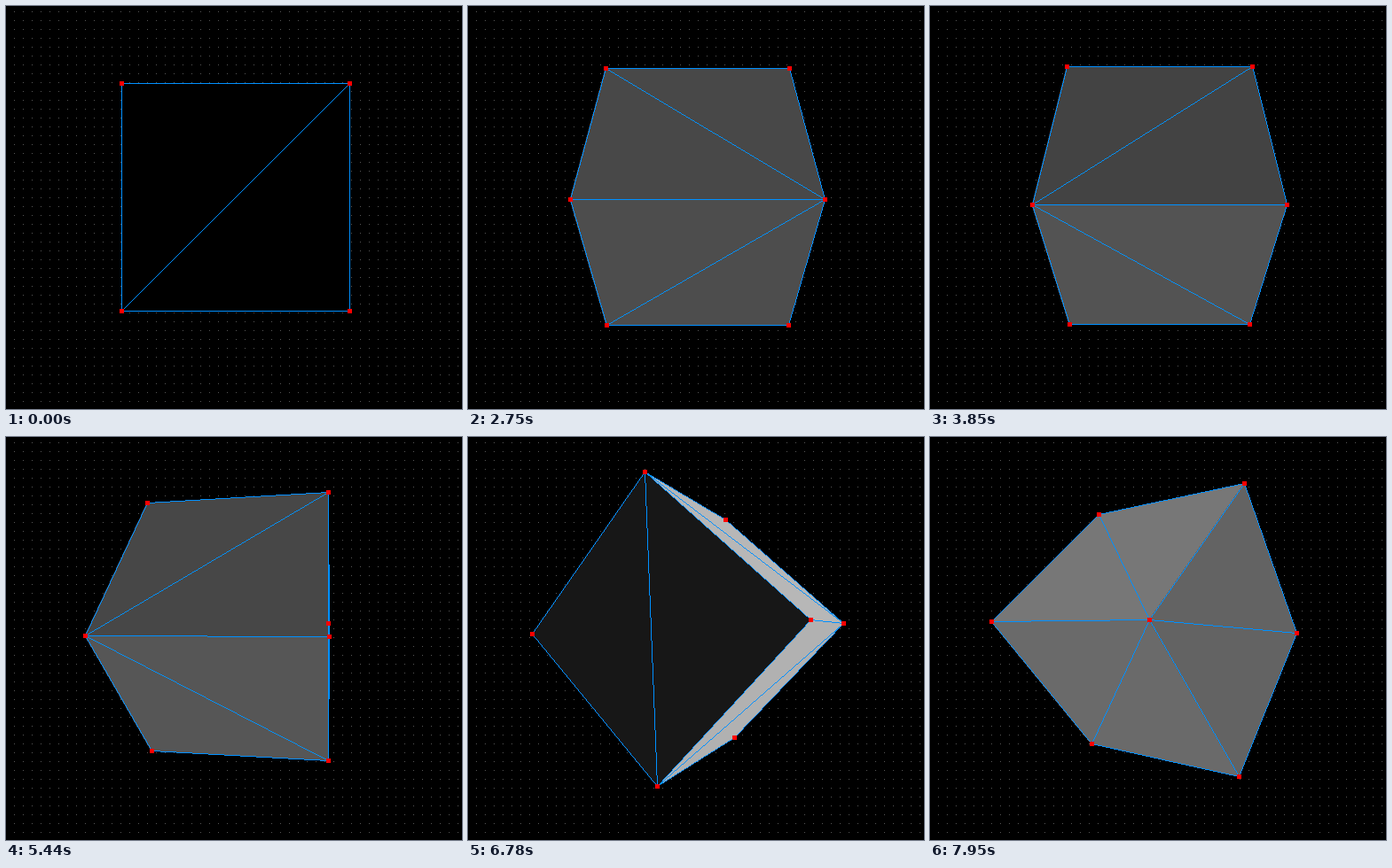
An HTML page with a canvas for the animation above (9.21 s loop, 514x455 px).

```html
<!DOCTYPE html>
<html lang="en">
<head>
<meta charset="utf-8">
<title>Rotating cube</title>
<style>
  html, body { margin: 0; width: 100%; height: 100%; overflow: hidden; background: #000; }
  canvas { display: block; }
</style>
</head>
<body>
<canvas id="stage" width="514" height="455"></canvas>
<script>
const ctx = document.getElementById('stage').getContext('2d');
const W = 514, H = 455, LOOP = 9210, TICK = LOOP / 110, LEAD = 15;
const CX = 258.45, CY = 215.5, FOCAL = W, DIST = 5;
const TURN = 0.2; // the cube turns in whole steps of this many radians
const BLUE = '#0090ff', RED = '#ff0000', DOT = '#555';

// Key points of each drag: [tick, steps turned]
const PITCH = [[28, 0], [30, 3], [44, 9], [46, 12]];
const YAW = [[64, 0], [65, 1], [68, 2], [70, 4], [75, 8], [77, 9], [83, 11],
             [84, 13], [88, 15], [91, 16], [93, 17], [95, 19]];

function turned(keys, tick) {
  if (tick <= keys[0][0]) return keys[0][1];
  const i = keys.findIndex(k => k[0] >= tick);
  if (i < 0) return keys[keys.length - 1][1];
  const [t0, v0] = keys[i - 1], [t1, v1] = keys[i];
  return Math.floor(v0 + (v1 - v0) * (tick - t0) / (t1 - t0) + 1e-6);
}

// Corner index bits: 1 = right, 2 = top, 4 = front.
// Diagonals join the corners that have an odd number of bits set.
const FACES = [4, 2, 1].flatMap(axis => [0, axis].map(side => {
  const [u, v] = [1, 2, 4].filter(bit => bit !== axis);
  const ring = [side, side | u, side | u | v, side | v];
  return side && axis ? ring : [...ring.slice(1), ring[0]];
}));

function corner(i, pitch, yaw) {
  const x = i & 1 ? 1 : -1, y = i & 2 ? 1 : -1, z = i & 4 ? 1 : -1;
  const cp = Math.cos(pitch), sp = Math.sin(pitch);
  const cw = Math.cos(yaw), sw = Math.sin(yaw);
  const y1 = y * cp - z * sp, z1 = y * sp + z * cp;
  const x2 = x * cw - z1 * sw, z2 = z1 * cw + x * sw;
  const k = FOCAL / (DIST - z2);
  return { x: Math.round(CX + x2 * k), y: Math.round(CY - y1 * k), z: z2 };
}

function line(a, b) {
  const dx = b.x - a.x, dy = b.y - a.y;
  const n = Math.max(Math.abs(dx), Math.abs(dy), 1);
  for (let i = 0; i <= n; i++)
    ctx.fillRect(Math.round(a.x + dx * i / n), Math.round(a.y + dy * i / n), 1, 1);
}

// Fills a convex shape row by row, without smoothing.
function fill(p) {
  const ys = p.map(q => q.y), bottom = Math.max(...ys);
  for (let y = Math.min(...ys); y <= bottom; y++) {
    const xs = [];
    p.forEach((a, i) => {
      const b = p[(i + 1) % p.length];
      if (a.y === b.y) {
        if (a.y === y) xs.push(a.x, b.x);
      } else if ((a.y - y) * (b.y - y) <= 0) {
        xs.push(a.x + (b.x - a.x) * (y - a.y) / (b.y - a.y));
      }
    });
    const left = Math.floor(Math.min(...xs));
    ctx.fillRect(left, y, Math.floor(Math.max(...xs)) - left + 1, 1);
  }
}

function grid() {
  ctx.fillStyle = '#000';
  ctx.fillRect(0, 0, W, H);
  ctx.fillStyle = DOT;
  for (let y = 6; y < 450; y += 10)
    for (let x = 9; x < W; x += 10) ctx.fillRect(x, y, 1, 1);
}

function drawFace(p, facing) {
  const v = Math.round(255 * (1 - facing));
  ctx.fillStyle = `rgb(${v},${v},${v})`;
  fill(p);
  ctx.fillStyle = BLUE;
  p.forEach((a, i) => line(a, p[(i + 1) % 4]));
  line(p[0], p[2]);
}

function draw(pitch, yaw) {
  const pts = Array.from({ length: 8 }, (_, i) => corner(i, pitch, yaw));
  const marked = new Set();
  grid();
  for (const face of FACES) {
    const p = face.map(i => pts[i]);
    const facing = (p[0].z + p[2].z) / 2;
    if (facing < 1e-6) continue;
    drawFace(p, facing);
    p.forEach(q => marked.add(q));
  }
  ctx.fillStyle = RED;
  marked.forEach(q => ctx.fillRect(q.x - 2, q.y - 2, 5, 5));
}

const start = performance.now();

function frame() {
  const t = (performance.now() - start) % LOOP;
  const tick = Math.floor((t + LEAD) / TICK);
  draw(turned(PITCH, tick) * TURN, turned(YAW, tick) * TURN);
  requestAnimationFrame(frame);
}
frame();
</script>
</body>
</html>
```
